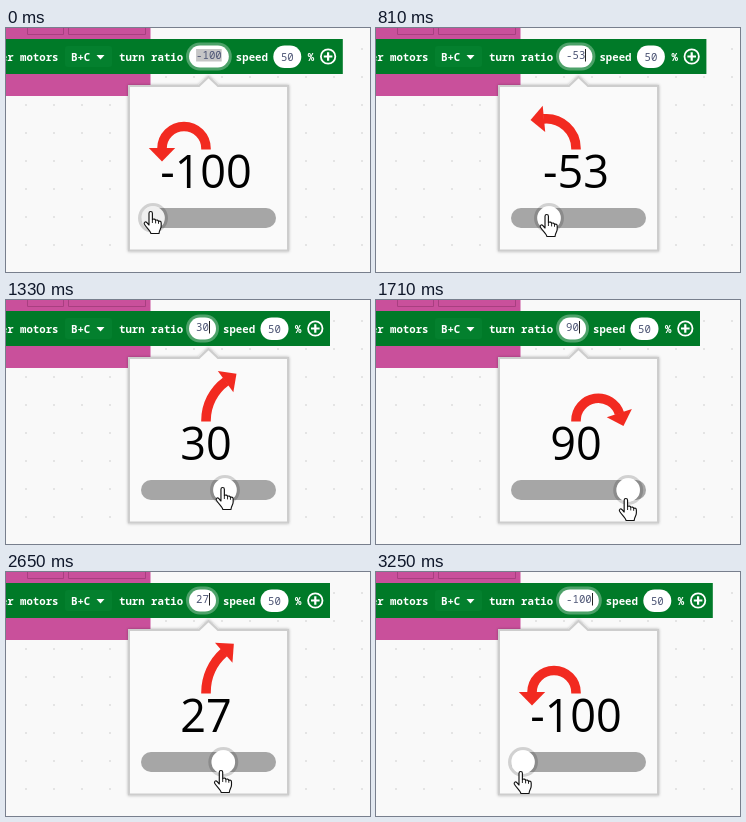
Write an HTML page that moves like this. It is 364 px wide and 244 px high and loops after 3330 ms.

```html
<!DOCTYPE html>
<html lang="en">
<head>
<meta charset="utf-8">
<title>Turn ratio slider</title>
<style>
  html, body { margin: 0; width: 100%; height: 100%; overflow: hidden; background: #f9f9f9; }
  svg { display: block; width: 364px; height: 244px; }
  .code { font: 600 10.7px "Noto Sans Mono", "DejaVu Sans Mono", monospace; fill: #fff; white-space: pre; }
  .code .bold { font-weight: 800; }
  .code .num { font-weight: 500; fill: #4d5575; text-anchor: middle; }
  .big { font: 400 45px "Open Sans", "Noto Sans", sans-serif; text-anchor: middle; fill: #000; }
</style>
</head>
<body>
<svg viewBox="0 0 364 244">
  <defs>
    <pattern id="dots" x="6" y="7" width="28" height="28" patternUnits="userSpaceOnUse">
      <path d="M13 14h2" stroke="#dedede" stroke-width="1.6"/>
    </pattern>
    <filter id="shadow" x="-10%" y="-10%" width="120%" height="120%">
      <feDropShadow dx="0" dy="0" stdDeviation="1.6" flood-color="#000" flood-opacity=".3"/>
    </filter>
  </defs>

  <rect width="364" height="244" fill="#f9f9f9"/>
  <rect width="364" height="244" fill="url(#dots)"/>

  <!-- surrounding block -->
  <rect x="-5" y="-5" width="149.5" height="73" fill="#c9509b"/>
  <path d="M21.5 -5V6.5H57.5V-5M62.5 -5V6.5H139.5V-5" fill="none" stroke="#a83f80"/>

  <!-- motor block -->
  <rect id="bar" x="-6" y="11" height="35" fill="#007a28"/>
  <rect x="59" y="18" width="47" height="21" rx="3" fill="#04802e"/>
  <path d="M90.5 27h8l-4 4.6z" fill="#fff"/>
  <g class="code">
    <text x="52.5" y="33" text-anchor="end">er <tspan class="bold">motors</tspan></text>
    <text x="65" y="33">B+C</text>
    <text x="113" y="33">turn ratio</text>
    <rect id="halo" x="180" y="14.5" height="28" rx="14" fill="#fff" fill-opacity=".3"/>
    <rect id="field" x="183" y="17.5" height="22" rx="11" fill="#fff"/>
    <rect id="mark" y="21" height="12.5" fill="#c6c6c6"/>
    <text id="entry" class="num" y="31"></text>
    <rect id="caret" y="21" width="1" height="12.5" fill="#222"/>
    <g id="tail">
      <text x="217" y="33">speed</text>
      <rect x="254.5" y="17.5" width="28" height="22.5" rx="11.2" fill="#fff"/>
      <text class="num" x="268.5" y="33">50</text>
      <text x="289" y="33">%</text>
      <g fill="none" stroke="#fff" stroke-width="2.2">
        <circle cx="309.3" cy="28.5" r="7.2" stroke-width="1.8"/>
        <path d="M305 28.5h8.6M309.3 24.2v8.6"/>
      </g>
    </g>
  </g>

  <!-- popup -->
  <path d="M123 58H193L202.5 49L212 58H282V222.5H123Z" fill="#fafafa" stroke="#cdcdcd" stroke-width="2" filter="url(#shadow)"/>
  <path id="arc" fill="none" stroke="#f22a20" stroke-width="9.6"/>
  <path id="head" d="M-13.2 0.5L0 -13L13.2 0.5Z" fill="#f22a20"/>
  <text id="label" class="big" x="200" y="159.7"></text>
  <rect x="135" y="180" width="135" height="20" rx="10" fill="#a6a6a6"/>
  <g id="knob">
    <circle cy="190" r="13.4" fill="none" stroke="#000" stroke-opacity=".16" stroke-width="3.2"/>
    <circle id="face" cy="190" r="11.8"/>
  </g>
  <g id="hand" stroke="#111" stroke-linejoin="round">
    <path d="M5.5 13V2.2a1.7 1.7 0 0 1 3.4 0V8.6c1-1 3-.6 3.2.8c1-.8 2.7-.3 2.9 1c1.2-.7 2.7 0 2.7 1.5V15c0 3-2 4-2.2 7.5H7.4C7 19.5 3 16.8 .9 13.2C0 11.2 2 10.2 3.4 11.6L5.5 14Z" fill="#fff" stroke-width="1.15"/>
    <path d="M8.9 8.6V12M12.1 9.4V12.4M15 10.4V12.8" fill="none" stroke-width=".9"/>
  </g>
</svg>

<script>
const LOOP = 3330, FIRST = 442, STEP = 73.6, CHAR = 6.4;

// drag path: step, slider value, hand top
const keys = [
  [0, -100, 183],
  [5, -53, 186],
  [12, 30, 187],
  [17, 90, 198],
  [19, 100, 201],
  [23, 100, 202],
  [25, 76, 198],
  [30, 27, 198],
  [38, -100, 199]
];

const el = id => document.getElementById(id);
const set = (id, attrs) => {
  for (const name in attrs) el(id).setAttribute(name, attrs[name]);
};

// slope of column c between keys i and i + 1
const secant = (i, c) => keys[i + 1]
  && keys[i] ? (keys[i + 1][c] - keys[i][c]) / (keys[i + 1][0] - keys[i][0]) : 0;

// slope at key i, level at the turning points
function tangent(i, c) {
  const before = secant(i - 1, c), after = secant(i, c);
  return before * after > 0 ? (before + after) / 2 : 0;
}

// smooth curve through column c
function sample(step, c) {
  const i = Math.max(0, keys.findIndex(k => k[0] >= step) - 1);
  const [a, b] = [keys[i], keys[i + 1]];
  const span = b[0] - a[0], p = (step - a[0]) / span, q = 1 - p;
  const ease = p * p * (3 - 2 * p);
  return a[c] + (b[c] - a[c]) * ease
    + span * p * q * (q * tangent(i, c) - p * tangent(i + 1, c));
}

// arc leaves straight up and always ends 44px from its start
function drawArrow(value) {
  const x = 200, y = 120.5, reach = 44;
  const half = value * Math.PI / 200;
  const ex = x + reach * Math.sin(half), ey = y - reach * Math.cos(half);
  const r = reach / 2 / Math.abs(Math.sin(half) || 1e-3);
  set('arc', { d: `M${x} ${y + 1}V${y}A${r} ${r} 0 0 ${value > 0 ? 1 : 0} ${ex} ${ey}` });
  set('head', { transform: `translate(${ex} ${ey}) rotate(${value * 1.8})` });
}

function drawField(text, selected) {
  const extra = Math.max(0, text.length - 2) * CHAR;
  const width = 27 + extra, mid = 183 + width / 2, half = text.length * CHAR / 2;
  set('bar', { width: 330 + extra });
  set('halo', { width: width + 6 });
  set('field', { width });
  set('mark', { x: mid - half, width: half * 2, opacity: selected ? 1 : 0 });
  set('caret', { x: Math.round(mid + half), opacity: selected ? 0 : 1 });
  set('entry', { x: mid });
  set('tail', { transform: `translate(${extra})` });
  el('entry').textContent = text;
}

function render(step) {
  const resting = step < 0, at = Math.max(0, step);
  const value = Math.round(sample(at, 1)), knob = 147 + (value + 100) * 0.5535;
  drawField(String(value), resting);
  drawArrow(value);
  el('label').textContent = value;
  set('knob', { transform: `translate(${knob})` });
  set('face', { fill: resting ? '#f0f0f0' : '#fff' });
  set('hand', { transform: `translate(${knob - 9.5} ${sample(at, 2)})` });
}

const start = performance.now();
let shown;
function loop() {
  const t = Math.max(0, performance.now() - start) % LOOP;
  const step = Math.min(38, Math.max(-1, Math.floor((t - FIRST) / STEP)));
  if (step !== shown) render(shown = step);
  requestAnimationFrame(loop);
}
loop();
</script>
</body>
</html>
```
